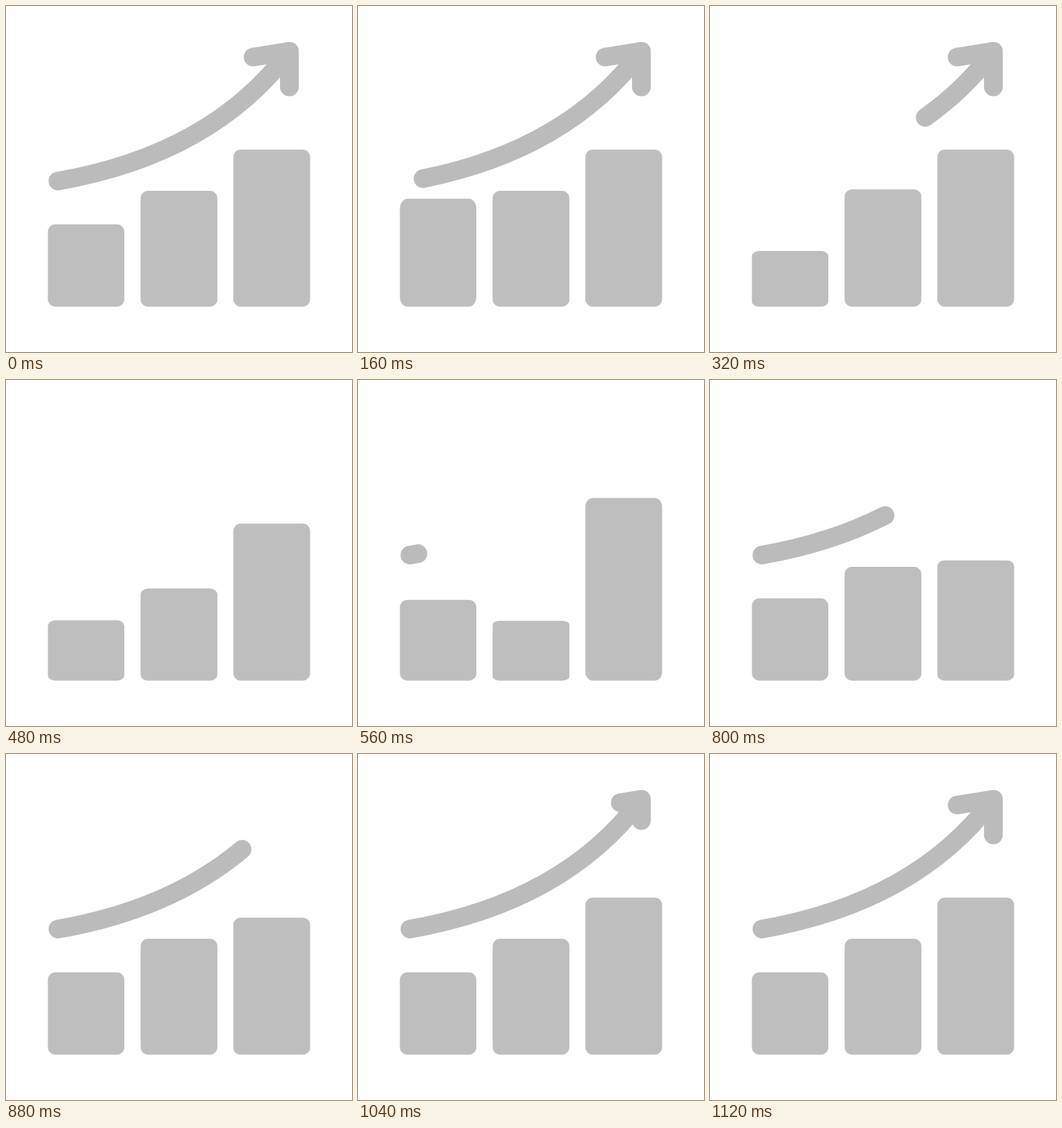
Recreate the animation shown at these times as an HTML page. Size 500 px wide and 500 px high, loop 1360 ms.

```html
<!DOCTYPE html>
<html lang="en">
<head>
<meta charset="utf-8">
<title>Growth chart</title>
<style>
  html, body { margin: 0; width: 100%; height: 100%; overflow: hidden; background: #fff; }
  svg { display: block; width: 100%; height: 100%; }
  rect { fill: #bebebe; }
  path { fill: none; stroke: #bbb; stroke-width: 27; stroke-linecap: round; }
</style>
</head>
<body>
<svg viewBox="0 0 500 500">
  <rect x="60.5" y="315.5" width="110.5" height="119" rx="11"/>
  <rect x="194.5" y="267" width="111" height="167.5" rx="11"/>
  <rect x="328.5" y="207.5" width="111" height="227" rx="11"/>
  <path id="shaft" d="M75 253Q298 214 409.5 65.5"/>
  <path id="head" d="M409.5 65.5L357 73.8M409.5 65.5V117"/>
</svg>
<script>
const STEP = 80, LOOP = 1360, BASE = 434.5;
const RISE = 39, RISE_TIME = 70, ARM = 53;

// Every bar stretches up, drops by its depth, then returns to rest.
const bounces = [
  { start: 100, low: 385, end: 585, depth: 59 },
  { start: 310, low: 555, end: 835, depth: 81 },
  { start: 500, low: 785, end: 985, depth: 54 }
];

const bars = [...document.querySelectorAll("rect")];
const shaft = document.getElementById("shaft");
const head = document.getElementById("head");
const shaftLength = shaft.getTotalLength();

const progress = (t, from, to) => Math.min(1, Math.max(0, (t - from) / (to - from)));
const easeIn = x => x * x;
const easeInOut = x => (1 - Math.cos(Math.PI * x)) / 2;

function bounce(t, { start, low, end, depth }) {
  const peak = start + RISE_TIME;
  return RISE * easeInOut(progress(t, start, peak))
    - (RISE + depth) * easeInOut(progress(t, peak, low))
    + depth * easeInOut(progress(t, low, end));
}

function trim(path, from, to) {
  const length = Math.max(0, to - from);
  path.style.visibility = length ? "visible" : "hidden";
  path.setAttribute("stroke-dasharray", `${length} 999`);
  path.setAttribute("stroke-dashoffset", -from);
}

function draw(now) {
  const t = Math.floor(now % LOOP / STEP) * STEP;

  bars.forEach((bar, i) => {
    const scale = 1 + bounce(t, bounces[i]) / bar.height.baseVal.value;
    bar.setAttribute("transform", `translate(0 ${BASE * (1 - scale)}) scale(1 ${scale})`);
  });

  // The arrow is wiped from its tail, then drawn again from the same end.
  const wiping = t < 480;
  const tail = wiping ? easeIn(progress(t, 100, 373)) : 0;
  const tip = wiping ? 1 : easeIn(progress(t, 481, 943));
  const arms = wiping ? 1 - progress(t, 373, 475) : progress(t, 943, 1110);
  trim(shaft, tail * shaftLength, tip * shaftLength);
  trim(head, 0, arms * ARM);
}

const start = performance.now();
function tick() {
  draw(performance.now() - start);
  requestAnimationFrame(tick);
}
tick();
</script>
</body>
</html>
```
